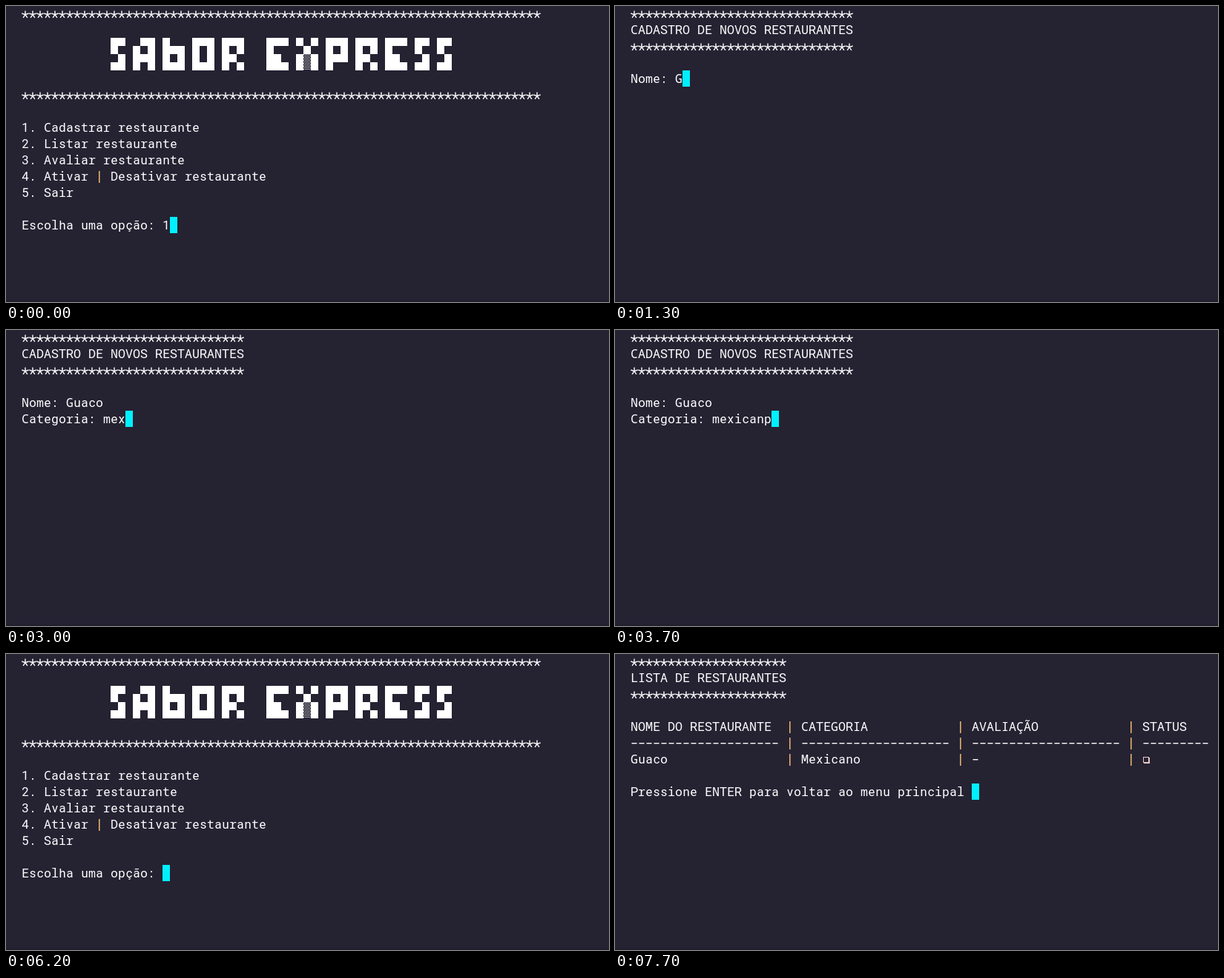
An HTML page with a canvas that plays this animation: 813x400 px, repeating every 8 s.

```html
<!DOCTYPE html>
<html lang="pt-BR">
<head>
<meta charset="utf-8">
<title>Terminal</title>
<style>
  html, body { margin: 0; width: 100%; height: 100%; overflow: hidden; background: #252232; }
  canvas { display: block; }
</style>
</head>
<body>
<canvas id="stage" width="813" height="400"></canvas>
<script>
const ctx = document.getElementById('stage').getContext('2d');
const LOOP = 8000, LEFT = 21, CELL = 10, ROW = 22, HALF = ROW / 2;
const BACK = '#252232', INK = '#fff', CURSOR = '#00f0ff', BAR = '#e5b06c';
const PROPORTIONAL = '16.667px Roboto, sans-serif';
const MONO = '16.667px "Noto Sans Mono", monospace';

const box = (x, y, w, h, color = INK) => {
  ctx.fillStyle = color;
  ctx.fillRect(x, y, w, h);
};

// Glyphs drawn by hand; x and y are the top left corner of the cell.
const shapes = {
  ' ': () => {},
  '█': (x, y) => box(x, y, CELL, ROW),
  '▀': (x, y) => box(x, y, CELL, HALF),
  '▄': (x, y) => box(x, y + HALF, CELL, HALF),
  '░': (x, y) => {
    for (let j = 0; j < ROW; j += 2)
      for (let i = j / 2 % 2; i < CELL; i += 2) box(x + i, y + j, 1, 1);
  },
  '-': (x, y) => box(x + 1.5, y + 11, 7, 1.4),
  '|': (x, y) => box(x + 4, y + 4, 1.6, 16, BAR),
  '*': (x, y) => {
    ctx.strokeStyle = INK;
    ctx.lineWidth = 1.4;
    ctx.beginPath();
    for (let arm = 0; arm < 5; arm++) {
      const angle = arm * Math.PI * 0.4;
      ctx.moveTo(x + 5, y + 12.6);
      ctx.lineTo(x + 5 + 4.9 * Math.sin(angle), y + 12.6 - 5.2 * Math.cos(angle));
    }
    ctx.stroke();
  },
  '❏': (x, y) => {
    ctx.strokeStyle = '#eec9c4';
    ctx.lineWidth = 1;
    ctx.strokeRect(x + 1.5, y + 8.5, 7, 7);
    box(x + 2, y + 16, 8, 1, '#eec9c4');
    box(x + 9, y + 9, 1, 8, '#eec9c4');
  }
};

// Letters that fit a cell come from the proportional face, the rest from the monospaced one.
const fonts = {};
function fontFor(char) {
  if (!fonts[char]) {
    ctx.font = PROPORTIONAL;
    const width = ctx.measureText(char).width;
    fonts[char] = width > 7.8 && width < 10.6 ? PROPORTIONAL : MONO;
  }
  return fonts[char];
}

function drawChar(char, x, y) {
  if (shapes[char]) return shapes[char](x, y);
  ctx.font = fontFor(char);
  ctx.fillStyle = INK;
  ctx.fillText(char, x + CELL / 2, y + 17);
}

function typed(t, keys, times) {
  return keys.slice(0, times.filter(time => time <= t).length).replace(/.[\b]/g, '');
}

const heading = title => {
  const rule = '*'.repeat(title.length);
  return [rule, title, rule, ''];
};

const menu = answer => [
  '*'.repeat(70), '',
  ' '.repeat(12) + '█▀ ▄▀█ █▄▄ █▀█ █▀█   █▀▀ ▀▄▀ █▀█ █▀█ █▀▀ █▀ █▀',
  ' '.repeat(12) + '▄█ █▀█ █▄█ █▄█ █▀▄   ██▄ █░█ █▀▀ █▀▄ ██▄ ▄█ ▄█',
  '', '*'.repeat(70), '',
  '1. Cadastrar restaurante',
  '2. Listar restaurante',
  '3. Avaliar restaurante',
  '4. Ativar | Desativar restaurante',
  '5. Sair', '',
  'Escolha uma opção: ' + answer
];

const BACK_TO_MENU = 'Pressione ENTER para voltar ao menu principal ';

function register(t) {
  const lines = heading('CADASTRO DE NOVOS RESTAURANTES');
  lines.push('Nome: ' + typed(t, 'Guaco', [1300, 1400, 1600, 1700, 1800]));
  if (t >= 2300) lines.push('Categoria: ' + typed(t, 'mexicanp\bo',
    [2700, 2800, 3000, 3200, 3300, 3400, 3600, 3700, 4200, 4600]));
  if (t >= 4800) lines.push('', 'Restaurante Guaco foi cadastrado com sucesso!', '', BACK_TO_MENU);
  return lines;
}

function list() {
  const row = (...cells) => cells.map((cell, i) => i < 3 ? cell.padEnd(20) : cell).join(' | ');
  const dashes = '-'.repeat(20);
  return [
    ...heading('LISTA DE RESTAURANTES'),
    row('NOME DO RESTAURANTE', 'CATEGORIA', 'AVALIAÇÃO', 'STATUS'),
    row(dashes, dashes, dashes, '-'.repeat(9)),
    row('Guaco', 'Mexicano', '-', '❏'),
    '', BACK_TO_MENU
  ];
}

function screenAt(t) {
  if (t < 500) return menu('1');
  if (t < 6200) return register(t);
  if (t < 7700) return menu(typed(t, '2', [7300]));
  return list();
}

function draw(t) {
  box(0, 0, 813, 400, BACK);
  box(0, 398, 813, 2, '#201d2c');
  ctx.textAlign = 'center';
  const lines = screenAt(t);
  lines.forEach((line, r) =>
    [...line].forEach((char, c) => drawChar(char, LEFT + c * CELL, r * ROW - 1)));
  const last = lines.length - 1;
  box(LEFT + lines[last].length * CELL, last * ROW - 1, CELL, ROW, CURSOR);
}

const start = performance.now();
function tick() {
  draw((performance.now() - start) % LOOP);
  requestAnimationFrame(tick);
}
tick();
</script>
</body>
</html>
```
